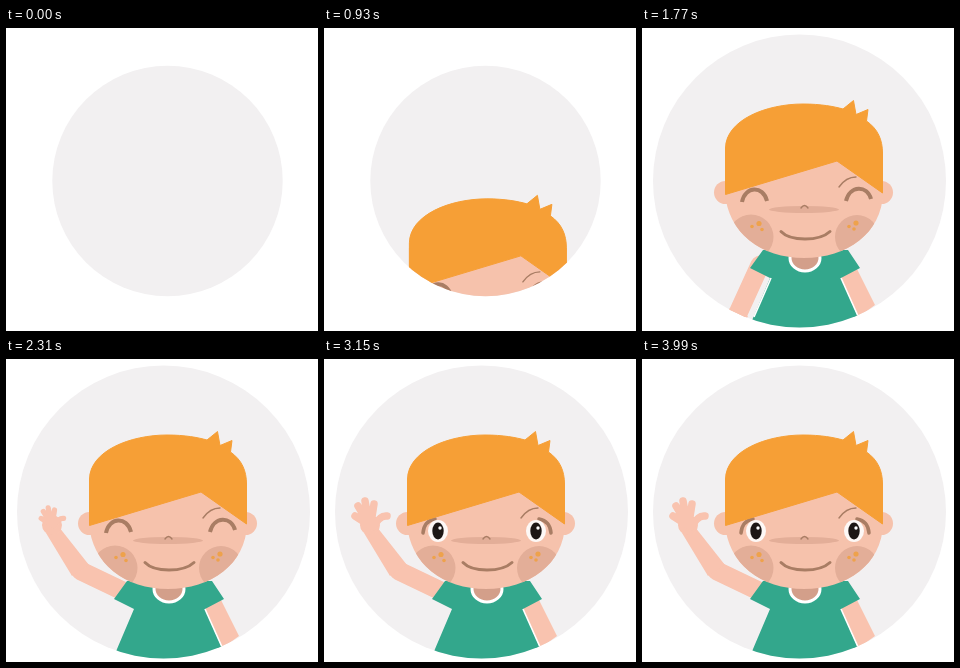
Animation, 312 px wide and 303 px high, one loop 4020 ms. Source, as an HTML page:

```html
<!DOCTYPE html>
<html lang="en">
<head>
<meta charset="utf-8">
<style>
  html, body { margin: 0; height: 100%; overflow: hidden; background: #fff; }
  svg { display: block; width: 100vw; height: 100vh; }
  .skin { fill: #f6c2ac; }
  .shade { fill: #e3ae98; }
  .line { fill: none; stroke: #a97d64; stroke-linecap: round; }
  .limb { fill: none; stroke: #f9c3af; stroke-linecap: round; }
  .gap { stroke: #fff; stroke-width: 1.6; }
</style>
</head>
<body>
<svg viewBox="0 0 312 303">
  <defs>
    <clipPath id="stage"><circle class="disc"/></clipPath>
    <path id="face" d="M83 125V165C86 205 119 230 162 230S240 205 241 165V125Z"/>
    <clipPath id="faceClip"><use href="#face"/></clipPath>
    <g id="openEye">
      <path class="line" stroke-width="3.5" d="M99 174Q100 162 111 160"/>
      <ellipse cx="114" cy="172" rx="10" ry="11" fill="#fdf8f6"/>
      <ellipse cx="114" cy="172" rx="5.7" ry="8.5" fill="#1d1715"/>
    </g>
  </defs>
  <circle class="disc" fill="#f2f0f1"/>
  <g clip-path="url(#stage)">
    <g id="boy">
      <g id="arm">
        <path class="limb" stroke-width="19" d="M121 234L75 212"/>
        <g id="forearm">
          <path fill="#f9c3af" d="M66 217L40 174L53 168L83 206Z"/>
          <circle cx="46" cy="166" r="10" fill="#f9c3af"/>
          <g id="fingers">
            <path class="limb" stroke-width="7.5" d="M45 166L31 157M45 165L34 147M45 164L41 142M47 164L50 145M49 168Q56 156 63 157"/>
          </g>
        </g>
      </g>
      <path fill="#f9c3af" d="M199 249L215 241L233 277L215 290Z"/>
      <path fill="#33a78c" d="M121 222H206L218 240L199 250L216 289V306H105L111 290L128 250L108 240Z"/>
      <path class="gap" d="M199 250L216 288"/>
      <path id="armGap" class="gap" d="M129 250L112 289"/>
      <ellipse cx="163" cy="230" rx="15" ry="13" fill="#d39f8a" stroke="#fff" stroke-width="3"/>
      <circle class="skin" cx="83.5" cy="164.5" r="11.5"/>
      <circle class="skin" cx="239.5" cy="164.5" r="11.5"/>
      <use href="#face" class="skin"/>
      <g class="shade" clip-path="url(#faceClip)">
        <circle cx="109" cy="209" r="22.5"/>
        <circle cx="215" cy="209" r="22"/>
        <ellipse cx="162" cy="181.5" rx="35" ry="3.5"/>
      </g>
      <g fill="#eea24c">
        <circle cx="117" cy="195.5" r="2.6"/><circle cx="110" cy="198.5" r="1.8"/><circle cx="120" cy="201.5" r="1.8"/>
        <circle cx="214" cy="195" r="2.6"/><circle cx="207" cy="198.5" r="1.8"/><circle cx="212" cy="201" r="1.8"/>
      </g>
      <path class="line" stroke-width="1.4" d="M159 180Q162.500 175 166 180M197 159Q204 149 214 149"/>
      <path class="line" stroke-width="3" d="M139 203.500Q146 211 163 211T188 203.500"/>
      <path id="closedEyes" class="line" stroke-width="4" style="stroke-linecap:butt" d="M100 174C103 158 121 157 125 173M204 173C208 157 225 157 229 171"/>
      <g id="openEyes">
        <use href="#openEye"/>
        <use href="#openEye" transform="matrix(-1 0 0 1 326 0)"/>
        <g fill="#fff"><circle cx="116" cy="169" r="1.7"/><circle cx="214" cy="169" r="1.7"/></g>
      </g>
      <path fill="#f69f36" stroke="#f69f36" stroke-linejoin="round" d="M83.500 166.500V120C84 92 124 76 161 76C179 76 192 78.500 201 81L211.500 72.500L214 86.500L226 81.500L224.500 93C236 101 240.500 112 240.500 125V165L195 133Z"/>
    </g>
  </g>
</svg>
<script>
  const LOOP = 4020;
  const el = id => document.getElementById(id);
  const discs = document.querySelectorAll('.disc');
  const progress = (t, start, end) => Math.min(1, Math.max(0, (t - start) / (end - start)));
  const sine = p => (1 - Math.cos(Math.PI * p)) / 2;
  const mix = (a, b, p) => a + (b - a) * p;
  const transform = (id, value) => el(id).setAttribute('transform', value);
  const show = (id, visible) => el(id).setAttribute('visibility', visible ? 'visible' : 'hidden');

  function draw(t) {
    const peek = progress(t, 210, 1290);
    const grow = sine(progress(t, 1290, 1740));
    const raise = sine(progress(t, 1820, 2300));
    const spread = sine(progress(t, 2330, 2520));
    const swing = t > 2310 ? -7 * sine((t - 2310) / 210) : 0;

    for (const disc of discs) {
      disc.setAttribute('cx', mix(161.5, 157.5, grow));
      disc.setAttribute('cy', 153);
      disc.setAttribute('r', mix(115.2, 146.5, grow));
    }
    const rise = mix(mix(197, 53, (peek + sine(peek)) / 2), 0, grow);
    transform('boy', `translate(${rise * 0.02} ${rise})`);

    transform('arm', `rotate(${mix(-91, 0, raise)} 121 237)`);
    transform('forearm', `rotate(${mix(-33, 0, raise) + swing} 75 212)`);
    transform('fingers', `translate(45 165) scale(${mix(0.7, 1, spread)}) translate(-45 -165)`);
    show('armGap', raise === 0);

    const awake = t >= 2760;
    show('openEyes', awake);
    show('closedEyes', !awake);
  }

  const begin = performance.now();
  function frame() {
    draw((performance.now() - begin) % LOOP);
    requestAnimationFrame(frame);
  }
  frame();
</script>
</body>
</html>
```
